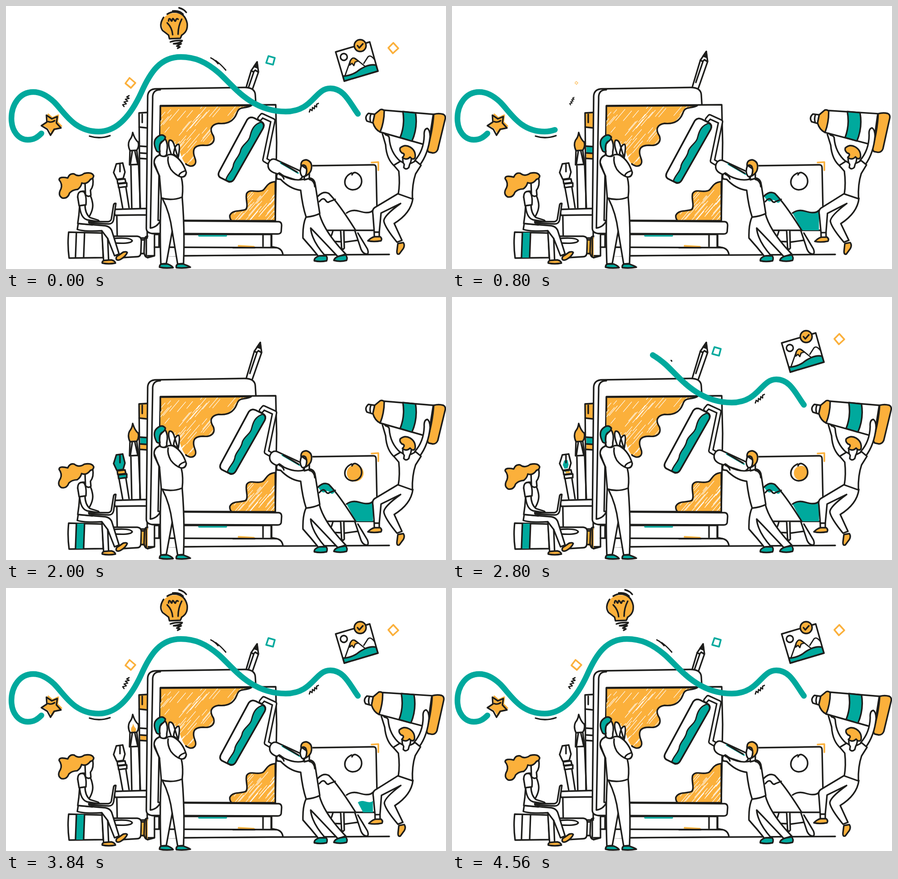
Write an HTML page that moves like this. It is 969x578 px and loops after 4.6 s.

```html
<!DOCTYPE html>
<html lang="en">
<head>
<meta charset="utf-8">
<title>Creative team</title>
<style>
html, body { margin: 0; width: 100%; height: 100%; overflow: hidden; background: #fff; }
svg { display: block; width: 100%; height: 100%; }
svg * { transform-box: fill-box; transform-origin: center; }
.ink { fill: none; stroke: #1d1d1b; stroke-width: 3.4; stroke-linecap: round; stroke-linejoin: round; }
.thin { stroke-width: 2.8; }
.w { fill: #fff; }
.a { fill: #fbb03b; }
.t { fill: #00a99d; }
.flat { stroke: none; }
.la { fill: none; stroke: #fbb03b; stroke-width: 3.6; }
.lt { fill: none; stroke: #00a99d; stroke-width: 3.6; }
.low { transform-origin: 50% 100%; }
.corner { transform-origin: 100% 100%; }
.move { animation: 4.6s ease-in-out infinite; }
.draw { stroke-dasharray: 1 2; }
#ribbon { stroke-width: 12.5; animation: ribbon 4.6s linear infinite; }
#jumper { transform-box: view-box; transform-origin: 870px 410px; }
#hair { transform-box: view-box; transform-origin: 186px 378px; }

@keyframes ribbon { 0%, .8% { stroke-dashoffset: 0 } 26.9% { stroke-dashoffset: -1.02 } 51.6% { stroke-dashoffset: -1.98 } 75.5%, to { stroke-dashoffset: -3 } }
@keyframes lineA { 0%, 11% { stroke-dashoffset: 0 } 15% { stroke-dashoffset: -1.05 } 59.6% { stroke-dashoffset: -1.95 } 65%, to { stroke-dashoffset: -3 } }
@keyframes lineB { 0%, 11% { stroke-dashoffset: 0 } 15% { stroke-dashoffset: -1.05 } 62% { stroke-dashoffset: -1.95 } 67%, to { stroke-dashoffset: -3 } }
@keyframes arc { 0%, 18.5% { stroke-dashoffset: 0 } 23% { stroke-dashoffset: -1.05 } 69% { stroke-dashoffset: -1.95 } 74%, to { stroke-dashoffset: -3 } }

/* props that leave and return */
@keyframes photo { 0%, 2% { scale: 1 } 9%, 51% { scale: 0 } 58%, to { scale: 1 } }
@keyframes gemR { 0%, 3% { scale: 1 } 8%, 52% { scale: 0 } 58%, to { scale: 1 } }
@keyframes zigR { 0%, 5% { scale: 1 } 10%, 54% { scale: 0 } 59.5%, to { scale: 1 } }
@keyframes gemM { 0%, 8% { scale: 1 } 13%, 56% { scale: 0 } 60.5%, to { scale: 1 } }
@keyframes bulb { 0%, 12.5% { scale: 1 } 17.5%, 63% { scale: 0 } 69%, to { scale: 1 } }
@keyframes gemL { 0%, 14% { scale: 1 } 19.5%, 66% { scale: 0 } 71%, to { scale: 1 } }
@keyframes zigL { 0%, 15.5% { scale: 1 } 20.5%, 67% { scale: 0 } 72%, to { scale: 1 } }
@keyframes star { 0%, 25% { scale: 1 } 30%, 74% { scale: 0 } 80%, to { scale: 1 } }

/* colours that fill and fade */
@keyframes band { 0%, 1% { scale: 1 0 } 9%, 87% { scale: 1 1 } 97%, to { scale: 1 0 } }
@keyframes spout { 0%, 3% { scale: 0 } 10%, 88% { scale: 1 } 96%, to { scale: 0 } }
@keyframes spine { 0%, 3% { scale: 0 } 10%, 85% { scale: 1 } 93%, to { scale: 0 } }
@keyframes stripe { 0%, 5% { scale: 0 1 } 13%, 72% { scale: 1 1 } 80%, to { scale: 0 1 } }
@keyframes brush { 0%, 5% { scale: 0 } 14%, 78% { scale: 1 } 89%, to { scale: 0 } }
@keyframes nib { 0%, 20% { scale: 0 } 28%, 54% { scale: 1 } 68%, to { scale: 0 } }
@keyframes cap { 0%, 8% { scale: 0 } 16%, 65% { scale: 1 } 74%, to { scale: 0 } }
@keyframes wave { 0%, 8% { scale: 0 } 16%, 78% { scale: 1 } 90%, to { scale: 0 } }
@keyframes sun { 0%, 20% { scale: 0 } 28%, 56.5% { scale: 1 } 74%, to { scale: 0 } }

/* gentle movement */
@keyframes pencil { 0%, 5% { translate: -7px 23px } 14%, 74% { translate: 0 0 } 82%, to { translate: -7px 23px } }
@keyframes roller { 0%, 1% { translate: 0 0 } 17%, 44% { translate: 3.5px 2.5px } 60%, 62% { translate: 0 0 } 82%, 85% { translate: 3.5px 2.5px } 98%, to { translate: 0 0 } }
@keyframes hair { 0%, 1% { rotate: 0deg } 17% { rotate: 2.3deg } 42% { rotate: 2.8deg } 60%, 62% { rotate: 0deg } 83% { rotate: 2.8deg } 98%, to { rotate: 0deg } }
@keyframes jumper { 0%, 1% { rotate: 0deg } 16%, 18% { rotate: -1.1deg } 29%, 58% { rotate: 0deg } 78%, 84% { rotate: -1.1deg } 97%, to { rotate: 0deg } }
</style>
</head>
<body>
<svg viewBox="0 0 969 578" preserveAspectRatio="none" class="ink">
<defs>
  <path id="blobA" d="M340 220L540 219C526 227 514 219 509 234C502 254 487 260 468 258C450 261 448 272 457 286C462 302 448 308 434 306C412 306 410 318 416 334C423 351 407 357 396 347C385 337 384 312 372 302L340 302Z"/>
  <path id="blobB" d="M593 386C574 388 573 400 566 405C552 412 538 400 530 412C526 422 535 440 528 447C518 452 499 447 493 460Q492 467 497 472L593 472Z"/>
  <clipPath id="clipA"><use href="#blobA"/></clipPath>
  <clipPath id="clipB"><use href="#blobB"/></clipPath>
</defs>

<!-- easel -->
<g>
  <path class="w" d="M676 351L809 349Q815 349 815 356L818 493H700"/>
  <path class="w" d="M737 494L739 531Q741 538 745 532L744 494M720 494Q716 510 708 517L737 518M745 519L774 515"/>
  <path class="t flat move corner" style="animation-name:wave" d="M750 455Q762 446 778 451Q800 458 808 449L808 493H770Z"/>
  <path class="t flat move" style="animation-name:cap" d="M688 419Q697 408 708 409Q718 416 725 426Q719 437 714 430Q707 423 702 429Q696 432 688 419Z"/>
  <circle class="a flat move" style="animation-name:sun" cx="769" cy="387" r="18.5"/>
  <path d="M761 367C740 376 742 402 763 404C786 404 790 376 772 367Q765 364 762 371"/>
  <path d="M686 419Q699 405 711 412Q733 434 770 493M690 430Q698 420 703 426Q708 434 712 430L725 425M750 455Q762 446 778 451Q800 458 808 449"/>
  <path class="w" d="M768 493L782 535Q787 546 796 545Q799 542 796 534L775 499"/>
  <path class="la" d="M805 344L820 343V361"/>
  <path d="M312 549L844 546"/>
</g>

<!-- tools -->
<g>
  <path class="a flat move low" style="animation-name:spine" d="M293 235H312V267H293Z"/>
  <path class="t flat move" style="animation-name:stripe" d="M296 308H312V323H296Z"/>
  <path class="a flat move" style="animation-name:spine" d="M296 323H312V336H296Z"/>
  <path d="M311 234L293 235L295 444M293 266L311 268M300 236V256M296 308L311 309M296 323L311 324M296 335L311 336"/>
  <path class="a flat move low" style="animation-name:brush" d="M279 278Q284 294 291 299Q294 308 288 317L273 318Q267 305 272 295Q278 288 279 278Z"/>
  <path d="M279 278Q284 294 291 299Q294 308 288 317L273 318Q267 305 272 295Q278 288 279 278ZM273 318L272 349L292 348L288 317M278 320L274 347M284 320L290 347M275 350L277 444M292 349L296 443"/>
  <path class="t flat move" style="animation-name:nib" d="M243 347L257 345L262 365L258 380L244 382L237 366ZM246 390L266 388V397L247 399Z"/>
  <path class="a flat move" style="animation-name:nib" d="M245 382L263 380L265 388L246 390Z"/>
  <path d="M237 366L243 347L257 345L262 365L258 379L244 381ZM251 347V364M245 382L262 380L264 388L246 390ZM247 391L266 389V397L248 399ZM249 400L257 444M264 398L271 443"/>
  <path class="w" d="M238 447L310 445V459L240 460ZM244 460L245 510H311V459"/>
</g>

<g class="move" style="animation-name:pencil">
  <path class="w" d="M528 182L547 119L560 100L563 122L541 185"/>
  <path d="M547 119L552 122L556 118L562 122M553 121L537 168"/>
  <path fill="#1d1d1b" d="M560 100L553 110L561 113Z"/>
</g>

<!-- tablet and its stand -->
<g>
  <path class="w" d="M312 553L327 549V502H585V529L595 531Q608 533 610 547L388 549"/>
  <path d="M337 503V530M327 530L595 531M566 503V528M584 503V529"/>
  <path class="la" d="M512 527L546 529"/>
  <path d="M500 531H548"/>
  <path class="w" d="M334 182L525 179Q548 179 549 195L552 245V488L325 500Q309 500 309 488L312 198Q313 181 334 182Z"/>
  <path d="M340 184Q322 184 323 203L318 487"/>
  <path class="w" d="M318 488Q333 486 340 472L601 474Q607 475 607 482L606 496Q605 501 598 501L322 500"/>
  <path class="lt" d="M425 505H485"/>
  <path class="w" d="M340 219L594 217L596 300L593 472L335 471Z"/>
  <use href="#blobA" class="a flat"/>
  <use href="#blobB" class="a flat"/>
  <path id="hatchA" clip-path="url(#clipA)" stroke="#fff" stroke-width="1.1"/>
  <path id="hatchB" clip-path="url(#clipB)" stroke="#fff" stroke-width="1.1"/>
  <path d="M340 250V220L540 219C526 227 514 219 509 234C502 254 487 260 468 258C450 261 448 272 457 286C462 302 448 308 434 306C412 306 410 318 416 334C423 351 407 357 396 347"/>
  <path d="M593 386C574 388 573 400 566 405C552 412 538 400 530 412C526 422 535 440 528 447C518 452 499 447 493 460Q492 467 497 472L593 472Z"/>
</g>

<!-- roller -->
<g class="move" style="animation-name:roller">
  <path stroke-width="12" d="M559 247L564 241L588 252L570 338L582 345"/>
  <path stroke="#fff" stroke-width="5.5" d="M559 247L564 241L588 252L570 338L582 345"/>
  <path class="w" d="M531 250Q537 242 546 246L562 254Q571 259 566 269L502 381Q497 388 490 386L472 377Q465 372 470 363Z"/>
  <path class="t thin" d="M562 255C546 260 541 272 538 284C535 300 522 302 517 316C515 330 505 335 501 348C500 362 488 368 484 382Q496 390 502 381L566 269Q570 260 562 255Z"/>
  <path d="M531 250Q537 242 546 246L562 254Q571 259 566 269L502 381Q497 388 490 386L472 377Q465 372 470 363Z"/>
  <path class="w" d="M578 345Q583 334 593 337L649 363Q657 369 651 378L644 384L589 366Q574 359 578 345Z"/>
  <path class="lt" stroke-width="5" d="M605 345L643 367"/>
  <path d="M607 345L641 365"/>
</g>

<!-- painter -->
<g>
  <path class="w" d="M661 463Q653 480 654 510Q672 530 688 550L702 548Q673 515 671 488Q683 500 731 551L748 545Q700 495 690 456Z"/>
  <path class="t" d="M679 560Q678 553 690 549H705Q709 553 706 560Q692 563 679 560ZM722 559Q724 552 736 549L748 547Q753 553 750 559Q736 563 722 559Z"/>
  <path class="w" d="M597 380Q593 370 602 367L612 374Q640 388 664 378Q679 377 681 392L691 456Q680 462 661 464Q653 440 649 405Q625 402 605 381Z"/>
  <path d="M602 370Q610 373 612 380M668 381Q679 383 680 397"/>
  <path class="w" d="M651 350Q645 364 651 373Q654 377 657 374L657 382L668 379V362Z"/>
  <path class="a" d="M650 352Q648 339 661 338Q674 341 673 355Q672 368 659 374Q665 362 660 352Q655 347 650 352Z"/>
</g>

<!-- viewer -->
<g>
  <path class="w" d="M342 420Q338 480 341 567L353 566L366 495L378 567L391 566Q394 490 388 420Z"/>
  <path d="M345 424Q361 455 366 495"/>
  <path class="t" d="M338 574Q338 567 345 567L356 567Q366 571 368 575Q350 577 338 574ZM375 575Q374 568 380 567L390 567Q402 571 406 574Q390 577 375 575Z"/>
  <path class="w" d="M364 326Q355 302 360 295Q366 293 370 304L378 331ZM369 325Q372 304 380 304Q384 307 379 334Z"/>
  <path class="w" d="M340 327Q323 332 327 350L338 374L342 422Q365 429 388 420Q391 395 386 376Q396 376 397 366Q390 342 373 330Q362 323 354 329Q348 333 340 327Z"/>
  <path d="M357 332Q355 345 363 359Q373 372 386 376M381 374Q380 367 395 362M327 346Q332 360 338 374"/>
  <path class="w" d="M339 304Q337 325 341 329Q350 333 354 326V320Q358 303 350 291Z"/>
  <path class="t" d="M332 319Q322 300 331 290Q343 278 351 288Q350 295 343 298Q336 304 339 320Q336 322 332 319Z"/>
</g>

<!-- writer -->
<g>
  <path class="w" d="M235 506L289 506Q298 507 298 516L297 541Q297 551 289 551L256 553M235 511Q275 508 278 516Q275 523 240 521"/>
  <path class="a flat move" style="animation-name:spout" d="M299 514L312 507V552L299 545Z"/>
  <path d="M298 514H304M298 544H304M312 506Q305 506 305 516L304 541Q305 552 312 553M309 508V551"/>
  <path class="w" d="M138 497L212 499L214 553L139 554Q135 525 138 497Z"/>
  <path class="t flat move low" style="animation-name:band" d="M155 498L173 498L171 553H153Z"/>
  <path d="M155 498L153 553M173 498L171 553"/>
  <path class="w" d="M159 478L157 491Q170 496 211 494L215 561L226 560L224 511L239 549L249 545L234 497Q231 485 219 483Z"/>
  <path d="M211 494L224 511"/>
  <path class="a" d="M212 565Q211 560 218 559L232 558Q240 560 241 565Q226 568 212 565ZM243 557Q241 551 248 548L258 541Q266 539 267 542Q263 551 252 557Q246 560 243 557Z"/>
  <path class="w" d="M177 408Q160 403 158 420L162 440Q161 460 158 478L190 481L183 463Q194 445 190 430Q188 420 185 416Z"/>
  <path class="w" d="M162 438Q164 466 179 470L203 474Q207 472 201 470L185 465Q174 456 174 437Z"/>
  <path class="w" d="M171 408Q158 405 158 420L161 439L176 437Q178 416 171 408Z"/>
  <path class="w" d="M182 474L225 474Q231 473 232 468L237 437Q238 433 242 434L237 470Q235 479 226 479L183 477Z"/>
  <path class="w" d="M174 388L175 415Q182 421 187 416L186 405Q194 395 191 378Z"/>
  <path id="hair" class="a move" style="animation-name:hair" d="M193 373Q189 364 172 368Q160 377 150 369Q140 367 136 378Q117 374 117 382Q125 392 121 402Q113 416 124 422Q136 424 140 411Q146 404 158 403Q165 398 167 389Q178 393 186 381Q193 379 193 373Z"/>
</g>

<!-- jumper -->
<g id="jumper" class="move" style="animation-name:jumper">
  <path class="w" d="M798 236L812 238L808 257L795 253Q789 244 798 236ZM804 237Q800 245 803 255"/>
  <path class="w" d="M833 229L941 238L930 307L824 277Z"/>
  <path class="a" d="M812 238L824 228Q829 226 833 230Q833 255 824 277Q812 271 808 256Z"/>
  <path class="t" d="M874 232Q879 262 868 289L894 297Q907 268 902 235Z"/>
  <path class="a" d="M942 238Q953 235 963 238Q969 241 967 249L951 315Q948 323 940 323L931 321Q926 317 930 307Q940 270 942 238Z"/>
  <path class="w" d="M829 281Q831 276 836 283Q844 285 844 290Q846 322 869 342L857 353Q838 338 836 305ZM921 285Q920 270 928 269Q934 273 934 287Q930 325 911 350L900 340Q920 318 921 285Z"/>
  <path class="w" d="M864 412L812 443Q806 447 808 457L811 497L822 497L826 455L869 434Q833 460 832 472Q834 486 861 519L872 515L855 478Q892 455 896 423Z"/>
  <path d="M811 497V508M822 497V508"/>
  <path class="a" d="M797 516Q805 508 812 507L824 507Q829 511 826 516Q810 519 797 516ZM863 522L875 520Q879 526 875 533L866 545Q860 547 861 538Z"/>
  <path class="w" d="M869 341L854 350L865 363Q868 390 864 413L895 424Q894 392 902 369L914 350L902 340Q885 353 869 341Z"/>
  <path class="w" d="M874 332Q873 344 877 348L876 355Q881 361 887 355L889 348Q894 340 892 328Z"/>
  <path class="a" d="M868 312Q878 303 890 310Q903 318 901 333Q897 340 890 332Q882 340 873 333Q881 325 872 323Q866 318 868 312Z"/>
</g>

<!-- ribbon and floating props -->
<path id="ribbon" class="lt draw" pathLength="1" d="M775 237C757 213 745 181 714 181C680 181 676 232 616 232C540 232 500 175 470 148C440 122 415 112 385 112C340 112 318 145 298 190C275 240 245 276 204 276C150 276 130 235 106 211C90 196 76 189 60 189C30 189 12 217 12 247C12 275 28 294 48 294C62 294 70 288 78 280"/>
<g class="move" style="animation-name:photo">
  <path class="w" d="M726 101L801 79L819 143L745 165Z"/>
  <path class="t" d="M742 154Q757 154 772 145Q796 126 815 130L819 143L745 165Z"/>
  <path class="w thin" d="M747 152L758 121Q763 111 770 116L790 132M788 126L797 112Q802 106 811 117"/>
  <path class="a thin" d="M758 121Q763 111 769 116L776 121L769 123L766 131L762 126L757 130Z"/>
  <circle cx="744" cy="112" r="7.5"/>
  <circle class="a" cx="780" cy="87" r="13"/>
  <path d="M774 87L778 92L786 83"/>
</g>
<path class="la move" style="animation-name:gemR" d="M853 81L864 93L852 104L842 92Z"/>
<path class="lt move" style="animation-name:gemM" d="M578 110L592 114L588 129L573 125Z"/>
<path class="la move" style="animation-name:gemL" d="M272 158L285 169L275 180L263 170Z"/>
<path class="thin move" style="animation-name:zigR" d="M668 233L670 227L674 230L675 223L679 226L680 219L684 222L684 216L688 214"/>
<path class="thin move" style="animation-name:zigL" d="M271 197L266 200L271 203L263 205L268 209L260 211L265 215L257 217L260 221"/>
<path class="thin draw move" style="animation-name:lineA" pathLength="1" d="M484 141Q474 129 462 120"/>
<path class="thin draw move" style="animation-name:lineB" pathLength="1" d="M467 127Q461 119 451 114"/>
<path class="draw move" style="animation-name:arc" pathLength="1" d="M229 285Q206 293 184 286"/>
<g class="move low" style="animation-name:bulb">
  <path class="a flat" d="M343 40C345 7 398 8 399 40Q397 57 386 67L382 71H362Q359 62 352 58Q343 52 343 40Z"/>
  <path d="M347 25Q336 42 345 54L358 64L360 72L384 71L387 64Q401 56 399 38Q394 15 372 13Q362 13 355 18"/>
  <path d="M355 37Q366 48 367 63M387 29Q379 44 379 62M358 33Q358 26 362 29Q365 36 366 31Q367 25 370 30Q373 36 374 31Q376 26 379 29"/>
  <path d="M362 79Q374 75 388 76Q386 81 369 83L386 83L376 88L383 90L378 93"/>
  <path d="M367 11Q382 9 390 18M381 4Q392 7 397 14"/>
</g>
<g class="move" style="animation-name:star">
  <path class="a" stroke="#fbb03b" d="M93 238L102 246L115 240L113 255L122 264L108 269L101 280L94 268L82 261L93 253Z"/>
  <path d="M89 240L101 248L113 243L111 257L121 268L106 271L98 284L91 271L78 263L90 255ZM93 254Q100 257 107 252"/>
</g>
</svg>
<script>
// Loose white scribbles running through the two painted areas
let seed = 7;
const rnd = () => (seed = seed * 16807 % 2147483647) / 2147483647;
function hatch(id, x, y, w, h, count) {
  let d = '';
  for (let i = 0; i < count; i++) {
    const px = x + rnd() * w, py = y + rnd() * h, len = 10 + rnd() * 30;
    d += `M${px.toFixed(1)} ${py.toFixed(1)}l${(len * .68).toFixed(1)} ${(-len * .8).toFixed(1)}`;
  }
  document.getElementById(id).setAttribute('d', d);
}
hatch('hatchA', 335, 225, 190, 130, 75);
hatch('hatchB', 490, 420, 105, 60, 40);
</script>
</body>
</html>
```
